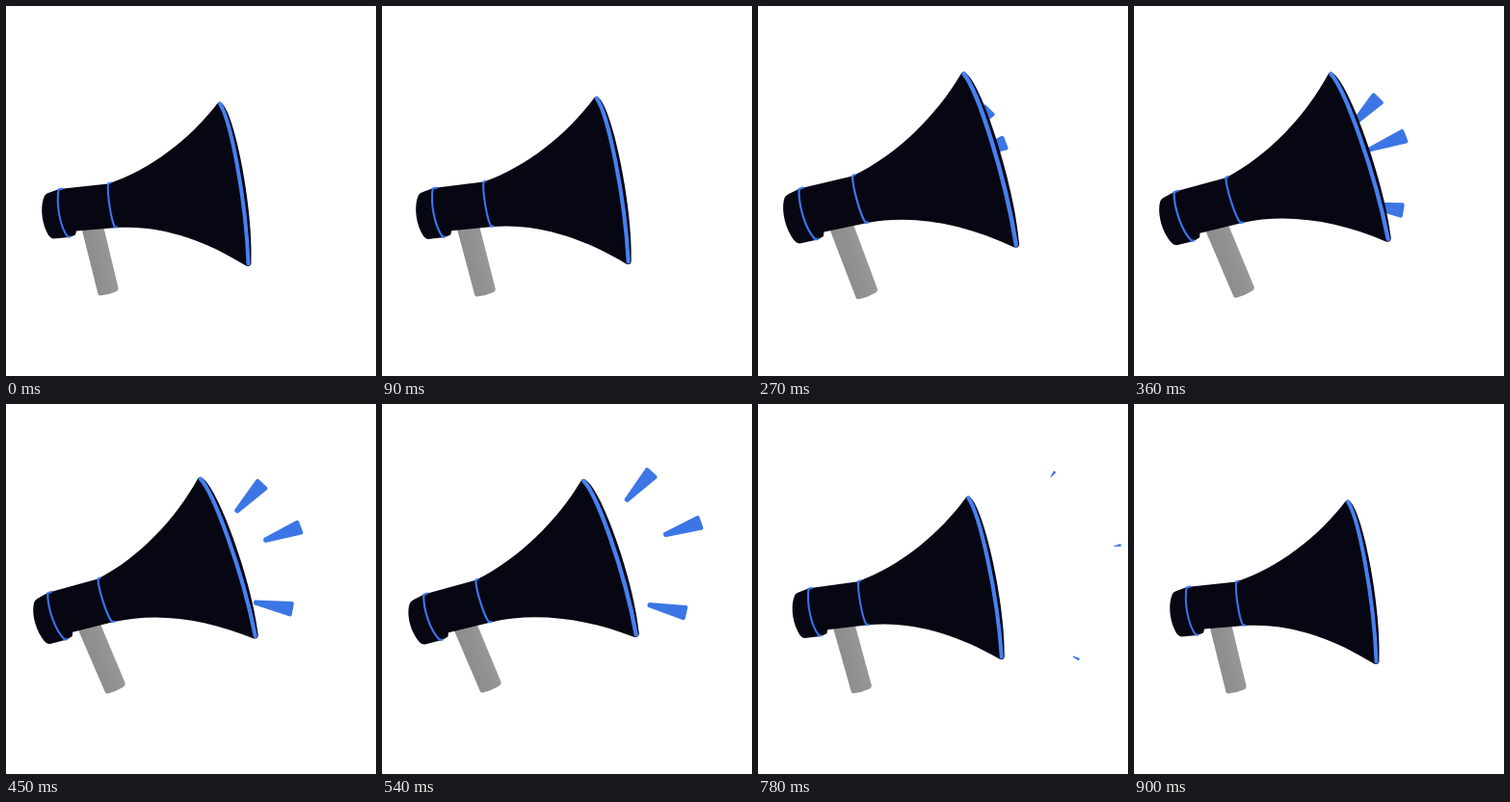
Animation of 384 by 384 pixels, one loop 0.93 s. Source, as an HTML page:

```html
<!DOCTYPE html>
<html lang="en">
<head>
<meta charset="utf-8">
<title>Megaphone</title>
<style>
  html, body { margin: 0; width: 100%; height: 100%; overflow: hidden; background: #fff; }
  svg { display: block; width: 100%; height: 100%; }
  .ring { fill: none; stroke: #3a76f0; stroke-width: 2; stroke-linejoin: round; }
  .rim { fill: none; stroke: #4780f2; stroke-width: 4; stroke-linecap: round; }
</style>
</head>
<body>
<svg viewBox="0 0 384 384">
  <defs>
    <linearGradient id="metal" gradientUnits="userSpaceOnUse" x1="87" y1="267" x2="110" y2="262">
      <stop offset="0" stop-color="#8d8d8d"/>
      <stop offset=".6" stop-color="#929292"/>
      <stop offset="1" stop-color="#989898"/>
    </linearGradient>
  </defs>
  <g id="rays" fill="#3c76e4"></g>
  <g id="horn">
    <path fill="url(#metal)" d="M78.500 231L101 228L116.500 292.500Q117 295 114 296.500Q106 300 98 300.500Q96 300.500 95.500 299Z"/>
    <path fill="#070713" d="M55 190L106 184.500C150 170 192 137 219.500 101Q222 97.500 225 102
      C239 118 257 215 254.500 267Q253.500 271.500 249 269.500C207 243 160 227 115 230L73 233.500L72 237.500L66 240
      L49 241.500Q45 241 42 234C36 221 36 205 40 197Q41 195 44 194Z"/>
    <path class="ring" d="M59 189.500L54.500 190.500C52 206 56 229 64 239.500L67 239.500"/>
    <path class="ring" d="M109 183.500L106 184.500C105 196 109 222 113 229.500L116 229.500"/>
    <path class="rim" d="M222 101.500C233 118 249 200 251.500 267.500"/>
  </g>
</svg>
<script>
const LOOP = 930, STEP = 30, TILT = 10;
const TIMES = [180, 360, 540, 660, 780, 840];
// Centre x, centre y and heading of each ray at TIMES
const RAYS = [
  { x: [213, 239.5, 266.5, 294, 306, 309], y: [134, 110, 86, 77, 73, 72], a: [-45, -46, -47.5, -49, -54, -56] },
  { x: [213, 262.5, 311.5, 352, 373, 378], y: [156, 142, 129.5, 133, 147, 156], a: [-21, -21, -19, -15, -10, -8] },
  { x: [223, 259, 295.5, 322, 330, 332], y: [205, 209, 212.5, 234, 263.5, 278], a: [8, 9, 12.3, 18, 26, 30] }
];

const horn = document.getElementById('horn');
const rays = RAYS.map(() => {
  const path = document.createElementNS('http://www.w3.org/2000/svg', 'path');
  path.setAttribute('d', 'M-19.500 -2.500L18.500 -7.700Q21 -8 21 -5.500L21 5.500Q21 8 18.500 7.700L-19.500 2.500Q-21.500 0 -19.500 -2.500Z');
  return document.getElementById('rays').appendChild(path);
});

const clamp = v => Math.min(1, Math.max(0, v));
const ease = (t, from, to) => (1 - Math.cos(Math.PI * clamp((t - from) / (to - from)))) / 2;
const hump = (t, centre, half) => 1 - ease(Math.abs(t - centre), 0, half);

// Smooth curve through the given values at TIMES
function track(values, t) {
  const last = TIMES.length - 1;
  let i = 0;
  while (i < last - 1 && t >= TIMES[i + 1]) i++;
  const slope = k => {
    const a = Math.max(k - 1, 0), b = Math.min(k + 1, last);
    return (values[b] - values[a]) / (TIMES[b] - TIMES[a]);
  };
  const span = TIMES[i + 1] - TIMES[i], u = clamp((t - TIMES[i]) / span), w = 1 - u;
  return values[i] * w * w * (1 + 2 * u) + values[i + 1] * u * u * (3 - 2 * u)
    + span * u * w * (slope(i) * w - slope(i + 1) * u);
}

function draw(t) {
  const turn = 9.2 * (ease(t, 15, 395) - ease(t, 480, 900));
  const sy = 1 + 0.1 * hump(t, 270, 270);
  const sx = sy + 0.1 * hump(t, 600, 215);
  horn.setAttribute('transform',
    `translate(94 253) rotate(${-TILT - turn}) scale(${sx} ${sy}) rotate(${TILT}) translate(-94 -253)`);

  const size = clamp((832 - t) / 292);
  rays.forEach((ray, i) => {
    const { x, y, a } = RAYS[i];
    ray.setAttribute('visibility', t > 180 && size > 0 ? 'visible' : 'hidden');
    ray.setAttribute('transform',
      `translate(${track(x, t)} ${track(y, t)}) rotate(${track(a, t)}) scale(${size})`);
  });
}

function tick() {
  draw(Math.floor(performance.now() % LOOP / STEP) * STEP);
  requestAnimationFrame(tick);
}
tick();
</script>
</body>
</html>
```
